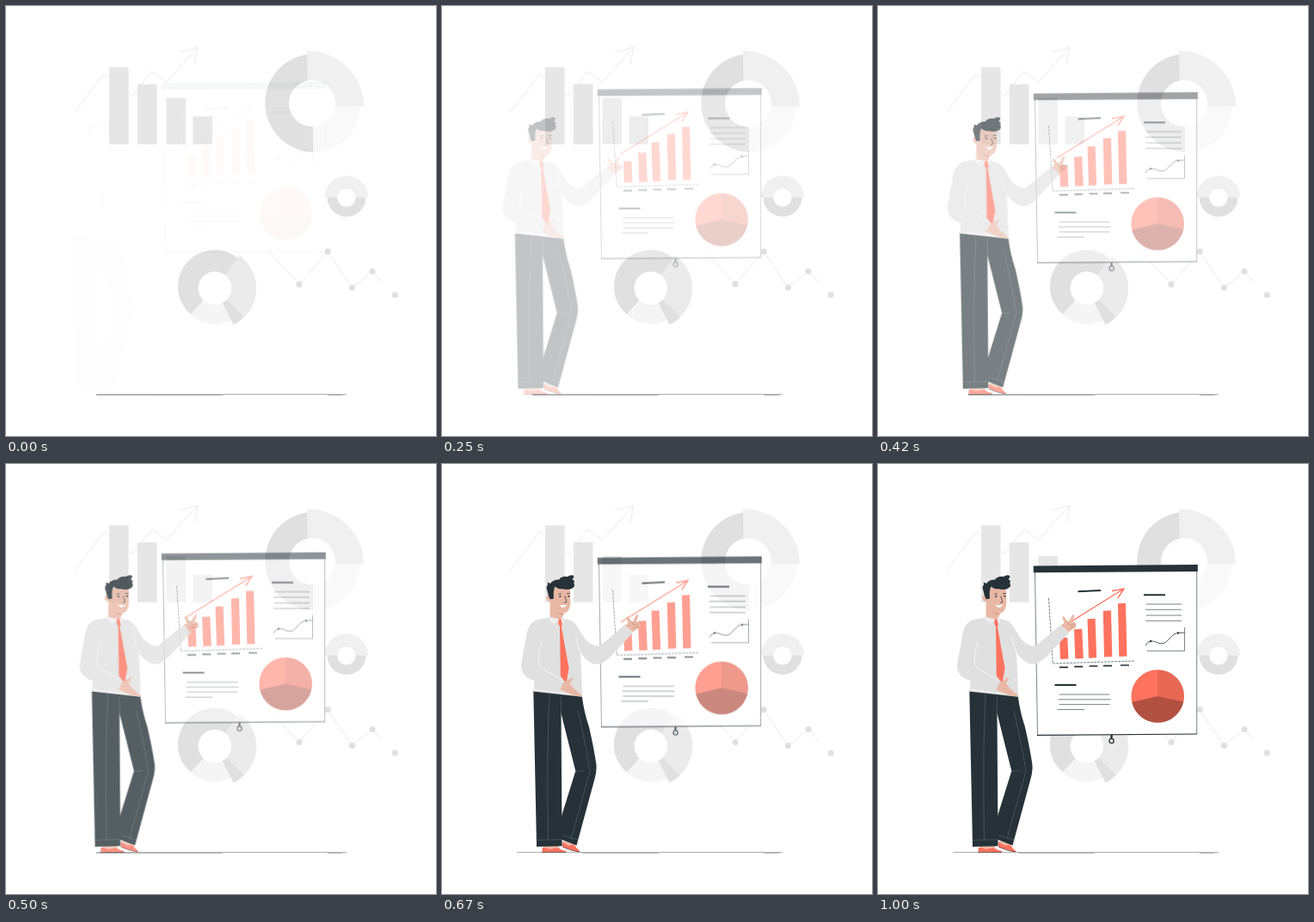
Animation, 500 px wide and 500 px high, one loop 1040 ms. Source, as an HTML page:

```html
<!DOCTYPE html>
<html lang="en">
<head>
<meta charset="utf-8">
<title>Presentation</title>
<style>
html, body { margin: 0; width: 100%; height: 100%; overflow: hidden; background: #fff; }
svg { display: block; width: 100%; height: 100%; }

/* Paused timelines: the script moves --t in steps of 24 per second. */
.anim {
  animation: 1000ms linear both paused;
  animation-delay: calc(var(--t, 40) * -1ms);
}
.board { animation-name: drop; }
.man { animation-name: enter; animation-timing-function: cubic-bezier(.36, -.01, .5, 1.38); }
.early { animation-name: hide; animation-timing-function: step-end; }
.late { animation-name: show; animation-timing-function: step-end; }
@keyframes drop { from { opacity: 0; transform: translateY(-30px); } to { opacity: 1; transform: none; } }
@keyframes enter { from { opacity: 0; transform: translateX(-30px); } to { opacity: 1; transform: translateX(0); } }
@keyframes hide { 0% { opacity: 1; } 54%, 100% { opacity: 0; } }
@keyframes show { 0% { opacity: 0; } 54%, 100% { opacity: 1; } }

.line { fill: none; stroke: #263238; }
.thin { stroke-width: .6; }
.bold { stroke-width: 2; }
.pale { fill: none; stroke: #e3e3e3; stroke-width: .7; }
.g1 { fill: #e0e0e0; }
.g2 { fill: #e6e6e6; }
.g3 { fill: #f0f0f0; }
.g4 { fill: #f9f9f9; }
.white { fill: #fff; }
.ink { fill: #263238; }
.coral { fill: #ff725e; }
.skin { fill: #e9b8a5; }
.seam { fill: none; stroke: #566970; stroke-width: .6; }
.fold { fill: none; stroke: #f7f7f7; stroke-width: .9; }
</style>
</head>
<body>
<svg viewBox="0 0 500 500">
  <!-- backdrop charts -->
  <path class="pale" d="M80 123 114 78.5 146.5 105 169.5 76 186.5 88.5 223 48M201 54 223 48 219 68"/>
  <path class="g2" d="M120 71.3h22.5V160.7H120zM153 91h22.5v69.7H153zM186.5 107H209v53.7H186.5zM217.5 128.6H240v32.1H217.5z"/>

  <path class="g4" d="M357 113H412.5A56 57 0 0 1 357 170z"/>
  <path class="g1" d="M357 170A57.3 57.2 0 0 1 350.5 56.2L357 113z"/>
  <path class="g3" d="M350 52A66 64.5 0 0 1 416 116.5H351z"/>
  <circle class="white" cx="356" cy="113.3" r="27"/>

  <path class="g3" d="M370.7 222.5a25.2 25.2 0 0 1 50.4 0z"/>
  <path class="g1" d="M373.5 222.5a22.5 22.5 0 0 0 45 0z"/>
  <circle class="white" cx="396" cy="223" r="10.6"/>

  <path fill="#f5f5f5" d="M243 328 214.5 358.5A42 42 0 0 0 264 364z"/>
  <path class="g1" d="M243 328 214.5 358.5A42 42 0 0 1 270.5 294z"/>
  <path fill="#ebebeb" d="M243 328 271.5 290.5A46 46 0 0 1 277 361.5z"/>
  <path class="g1" d="M243 328 264.5 370.5Q271.500 367.500 277 361.500z"/>
  <circle class="white" cx="242.800" cy="328" r="19.300"/>

  <path class="pale" d="M304 283.500 341 323.500 374 285.500 402.500 327.500 426 308.500 438 321"/>
  <g class="g1">
    <circle cx="341" cy="323.500" r="3.500"/>
    <circle cx="374.200" cy="285.500" r="3.500"/>
    <circle cx="402.500" cy="327.500" r="3.500"/>
    <circle cx="426" cy="308.400" r="3.500"/>
    <circle cx="452.200" cy="336" r="3.500"/>
  </g>

  <!-- floor -->
  <path fill="none" stroke="#a6a6a6" stroke-width=".9" d="M105 451.500H396"/>
  <path fill="#b5b5b5" d="M160 451.500H258L250 453H164zM372 451.500H396L390 453H375z"/>
  <path class="anim early" fill="#b5b5b5" d="M104 452 110 451H170V453H106z"/>
  <path class="anim late" fill="none" stroke="#a6a6a6" stroke-width=".9" d="M87 451.500H105"/>

  <g class="anim board">
    <path class="white" d="M182.500 122 371 121V314L185.500 315.500z"/>
    <path class="line thin" d="M182.500 126 185.500 315.500M370.700 124V314"/>
    <path class="line" stroke-width="1.200" d="M185 315.300 371 314"/>
    <path class="ink" d="M180.800 118.600 371.800 117V125L180.800 126.200z"/>
    <path class="ink" d="M270.300 315h2.400v4.500h-2.400z"/>
    <circle class="line" stroke-width="1.300" cx="271.600" cy="322" r="2.600"/>

    <!-- bar chart -->
    <path class="line bold" d="M232.500 148.300 259 147"/>
    <path class="line thin" stroke-dasharray="3 1" d="M198.500 156 203.300 232 298 229"/>
    <path class="coral" d="M211 202.300 220.300 201.800 221.500 226.500 212 227z
      M228 192.300 237.300 191.800 238.800 226 229.300 226.500z
      M243.500 180.300 252.600 179.800 254.200 225.300 245 225.800z
      M261.800 170.800 271 170.300 272.300 224 263 224.500z
      M279 162.300 288 161.800 289.500 223.400 280.300 224z"/>
    <path class="line" stroke-width="1.700" d="M211 236.300h10M228.300 235.600h10M245.500 235h10M262 234.700h10M282 234h10"/>
    <path fill="none" stroke="#ff725e" stroke-width="1.400" d="M208 193.500 286 145M272 147.800 286 145 278.800 156"/>

    <!-- notes and small graph -->
    <path class="line bold" d="M309 152.200h25M205.500 257h25"/>
    <path class="line thin" d="M312 163h41M311 169.300h42M312 176h41M311 182.300h42
      M210.500 268h59M209.500 273.800h61M210.500 279.600h59M208.500 285.500h31.500"/>
    <path class="line thin" d="M356.500 190V217.300H313"/>
    <path class="line" stroke-width=".8" d="M311 211Q314 206 317 206C324 205.500 326 210 332 208.500S341 197 349 196.500L356.500 196"/>
    <circle class="ink" cx="317" cy="206" r="1.200"/>
    <circle class="ink" cx="349" cy="196.500" r="1.200"/>

    <!-- pie -->
    <circle class="coral" cx="325.200" cy="270" r="30.800"/>
    <path fill-opacity=".09" d="M325 270V239.200A30.800 30.800 0 0 1 355.300 276.500z"/>
    <path fill-opacity=".3" d="M325 270 355.300 276.500A30.800 30.800 0 0 1 295.200 277z"/>
  </g>

  <g class="anim man">
    <!-- shoes -->
    <path class="skin" d="M119 442H136V447H119zM141 438 154 442 153 447 141 444z"/>
    <path class="coral" d="M117 445.500 125 447.500 135 446.500Q139 449 144 450V451.600H116.300zM140 439.500 147 443.500 154 443Q157 448 160.500 450.300L159 451.300Q148 449 140 445z"/>
    <path class="line thin" d="M116.300 451.600H144M140 445.200Q150 450 160 451"/>

    <!-- trousers -->
    <path class="ink" d="M128 265 162.800 270Q165 288 171 306 177 332 179.500 350 180 358 177 368L156.500 443.500 138.500 436.500V411L155.300 357 138.500 290z"/>
    <path class="ink" d="M106.300 264 142 267 138.500 290 139.600 444.300 110 445z"/>
    <path class="seam" d="M125 267Q121.500 340 123.500 437M110 437.300 139.500 436.700M138.500 270V290
      M158 287Q167 325 172 357L150 436M155 357.500 166 356.500M140 431.500 158 437"/>

    <!-- raised arm, shirt, resting arm -->
    <path class="g1" d="M124 178.500 141 180Q151 180.500 156 187L166 203Q176 214 184 211L212.500 187 222.500 195.500 196 224Q186 234 177 232.500 168 230 161 219L163.200 270.800 106.300 264.500 107.500 252Q97 249 93.500 242 91 236 93 228L98.500 197Q102 181 115 180.500z"/>
    <path class="fold" d="M116.300 206Q112 221 112.500 232 113 236 117 238L139 251M106.500 262 162.500 269M155 200Q158 212 161 219"/>
    <path class="skin" d="M125.500 156V178.500Q131 182 140 179.500L141.500 170z"/>
    <path fill="#d98f7e" d="M133 171.500Q138 174.500 141.500 174L141.400 175.600Q136 175.500 133 171.500z"/>
    <path fill="#ededed" d="M124 177.500 136.500 180.500 130 186.500 123.500 180zM136.500 180.500 141 178 143 180 141 186z"/>
    <path class="coral" d="M135.500 180.500 138.500 180.300 139.800 186.500 138.800 189 147.600 237.500 144.500 255 137.800 246.500 137 189 135.300 186z"/>

    <!-- hands -->
    <path class="skin" d="M137.500 262.500 141 254.500 151.500 248Q153.500 249 148.700 255L154 261.500 163.800 270.300Q156 270.500 149 267.500z"/>
    <path class="skin" d="M213 187.500 216.500 185 214.300 178.500Q214.500 176.500 216.300 177.500L220 182.500 221.800 183 226 175.500Q228 174.500 228.500 176.300L225.800 183.200 229.600 184.500Q231.500 187.500 229.300 190L225.500 192.800 222 195.200z"/>
    <path fill="none" stroke="#c98672" stroke-width=".6" d="M220 182.500 222.500 187 228.500 186.500M223 190 229 189.500"/>

    <!-- head -->
    <path class="skin" d="M128 144 149 143.500 149.300 163Q148.500 173 140 174.300 130 173 127 160 121.500 160.500 121.300 155 122 151 127 153z"/>
    <path class="ink" d="M125.600 157.200Q123.500 153 122.500 147.500 120.500 143 123 140.500L122.800 137.500 126 139Q129.500 134 136 134.500 139 130 146 131 149 128.500 152.500 129.500 154.500 131.500 151.500 134 155 135.500 153.300 138.500 155.500 143 150.500 145 146 147 140 145.300 134 145.500 131.800 142.500 129 146 130 156.500z"/>
    <path fill="#fff" d="M136 163.500Q141 165.300 144.800 163.300 143 168 139 166.500z"/>
    <path class="line" stroke-width=".7" d="M135 151.300 139 150.800M145 150.800 149 150.300M142.800 153.500 145 160.500 142 161.500"/>
    <circle class="ink" cx="137.300" cy="154" r="1"/>
    <circle class="ink" cx="147.300" cy="153.800" r="1"/>
  </g>
</svg>
<script>
const LOOP = 1040, STEP = 1000 / 24, start = performance.now();

function draw() {
  const t = (performance.now() - start) % LOOP;
  let step = Math.min(24, Math.floor((t + 4) / STEP));
  if (step < 2) step = 0; // opening pose is held for two steps
  document.documentElement.style.setProperty('--t', (step + 1) * 40);
  requestAnimationFrame(draw);
}
draw();
</script>
</body>
</html>
```
